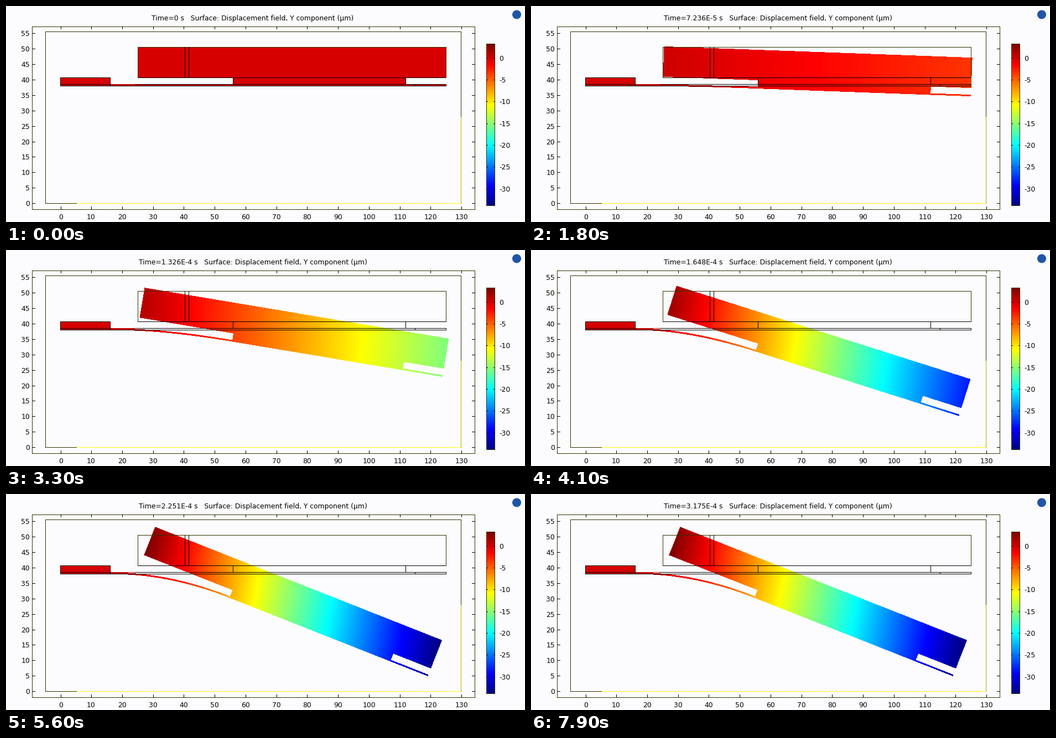
A matplotlib script that plays this animation: 938x390 px, repeating every 8 s.

```python
import math

import matplotlib.pyplot as plt
import numpy as np
from matplotlib.animation import FuncAnimation
from matplotlib.colors import LinearSegmentedColormap
from matplotlib.patches import Circle

W, H, DPI = 938, 390, 100
FRAMES, INTERVAL = 80, 100
PX = 1 / DPI * 72           # one pixel in points
X0, Y0, UNIT = 99.0, 356.5, 5.573
V_MIN, V_MAX = -33.9, 3.2
BLACK, OLIVE, YELLOW = "#000000", "#333300", "#ffff00"
RAINBOW = LinearSegmentedColormap.from_list("rainbow_jet", [
    (0, "#000080"), (0.125, "#0000ff"), (0.375, "#00ffff"),
    (0.625, "#ffff00"), (0.875, "#ff0000"), (1, "#800000")], N=512)

plt.rcParams["font.family"] = "DejaVu Sans"
fig = plt.figure(figsize=(W / DPI, H / DPI), dpi=DPI, facecolor="#fcfcfe")
ax = fig.add_axes([0, 0, 1, 1])
ax.axis("off")


def line(x1, y1, x2, y2, color=BLACK, z=3):
    # coordinates are pixel centres, so snapping would move the line
    ax.plot([x1, x2], [y1, y2], color=color, lw=PX, snap=False,
            solid_capstyle="projecting", zorder=z)


def box(x1, y1, x2, y2, color=BLACK):
    for seg in ((x1, y1, x2, y1), (x2, y1, x2, y2),
                (x1, y2, x2, y2), (x1, y1, x1, y2)):
        line(*seg, color)


def label(x, base, text, ha="center"):
    return ax.text(x, base, text, ha=ha, va="baseline", fontsize=12.35 * PX,
                   color=BLACK, zorder=4)


def px(x):
    return math.floor(x) + 0.5


def draw_axes():
    left, top, right, bottom = 47.5, 37.5, 847.5, 367.5
    box(left, top, right, bottom, OLIVE)
    for v in range(0, 131, 10):
        x = px(X0 + v * UNIT)
        line(x, top, x, top + 4)
        line(x, bottom - 5, x, bottom)
        label(x - 0.5, 385.3, str(v))
    for v in range(0, 56, 5):
        y = px(Y0 - v * UNIT)
        line(left, y, left + 5, y)
        line(right - 5, y, right, y)
        label(43, y + 4.5, str(v), "right")


def draw_outline():
    # surrounding domain
    box(71.5, 46.5, 822.5, 356.5, OLIVE)
    line(128.5, 356.5, 822.5, 356.5, YELLOW)
    line(822.5, 200.5, 822.5, 356.5, "#b0b000")
    # plate, anchor, post and thin layer at rest
    box(238.5, 74.5, 795.5, 129.5, OLIVE)
    line(238.5, 129.5, 795.5, 129.5)
    for x in (323.5, 330.5):
        line(x, 74.5, x, 129.5)
    box(98.5, 129.5, 188.5, 144.5)
    for x in (410.5, 722.5):
        line(x, 129.5, x, 141.5)
    box(98.5, 141.5, 795.5, 144.5)
    line(739.5, 141.5, 739.5, 144.5)
    line(190.5, 141.5, 232.5, 141.5, "#b00000")


def draw_colorbar():
    left, top, right, bottom = 868, 69, 884, 361
    ramp = np.linspace(1, 0, 293)[:, None]
    ax.imshow(ramp, cmap=RAINBOW, extent=(left, right, bottom, top),
              aspect="auto", interpolation="nearest", zorder=2)
    box(left + 0.5, top - 0.5, right - 0.5, bottom - 0.5, OLIVE)
    for v in range(0, -31, -5):
        y = px(94 - v * 7.87)
        line(left + 0.5, y, left + 2.5, y)
        line(right - 2.5, y, right - 0.5, y)
        label(891, y + 4.5, str(v), "left")


COLS, ROWS = np.meshgrid(np.arange(W) + 0.5, np.arange(H) + 0.5)
ROOT, PIVOT, AXIS = 188.5, 410.0, 143.0
SPAN = PIVOT - ROOT
BODY = [(238, 74.5, 795.5, 129.5),
        (PIVOT, 129.5, 722.5, 141.5),
        (PIVOT, 141.5, 795.5, 144.5)]


def inside(x, y, rect):
    x1, y1, x2, y2 = rect
    return (x >= x1) & (x <= x2) & (y >= y1) & (y <= y2)


def pose(n):
    """Tilt and pivot shift: accelerating pull-in, then a hard stop."""
    tilt = min(9.57e-5 * n**2 + 5.17e-8 * n**4, 0.3758)
    ratio = np.interp(n, [41, 44], [0.572, 0.518])
    return tilt, -0.18 * SPAN * tilt**2, ratio * SPAN * tilt


def field(n):
    """Vertical displacement in µm per pixel, NaN outside the solid."""
    tilt, dx, dy = pose(n)
    c, s = math.cos(tilt), math.sin(tilt)
    out = np.full((H, W), np.nan)

    # flexible beam as a cubic that meets the rigid part smoothly
    reach = SPAN + dx
    u = (COLS - ROOT) / reach
    slope = reach * math.tan(tilt)
    a, b = 3 * dy - slope, slope - 2 * dy
    sag = a * u**2 + b * u**3
    grade = (2 * a * u + 3 * b * u**2) / reach
    beam = ((u >= 0) & (u <= 1)
            & (np.abs(ROWS - AXIS - sag) <= 1.5 * np.sqrt(1 + grade**2)))
    out[beam] = -sag[beam] / UNIT

    # rigid plate, traced back to its place at rest
    rx, ry = COLS - PIVOT - dx, ROWS - AXIS - dy
    mx = PIVOT + rx * c + ry * s
    my = AXIS - rx * s + ry * c
    body = np.any([inside(mx, my, r) for r in BODY], axis=0)
    out[body] = (my - ROWS)[body] / UNIT

    out[inside(COLS, ROWS, (98.5, 129.5, ROOT, 144.5))] = 0
    return out


def seconds(n):
    if n == 0:
        return "0"
    t = n * 8e-4 / 199
    e = math.floor(math.log10(t))
    mantissa = math.floor(t / 10**e * 1000 + 1e-6) / 1000
    return f"{mantissa:g}E{e}"


draw_axes()
draw_outline()
draw_colorbar()
ax.add_patch(Circle((923, 15.5), 8, color="#1f55a8", lw=0, zorder=3))
title = label(446, 26, "")
solid = ax.imshow(field(0), cmap=RAINBOW, vmin=V_MIN, vmax=V_MAX,
                  extent=(0, W, H, 0), aspect="auto",
                  interpolation="nearest", zorder=1)
ax.set_xlim(0, W)
ax.set_ylim(H, 0)


def update(n):
    solid.set_data(field(n))
    title.set_text(f"Time={seconds(n)} s   Surface: Displacement field, "
                   "Y component (µm)")
    return solid, title


anim = FuncAnimation(fig, update, frames=FRAMES, interval=INTERVAL,
                     repeat=True, repeat_delay=0, blit=False)
plt.show()
```
